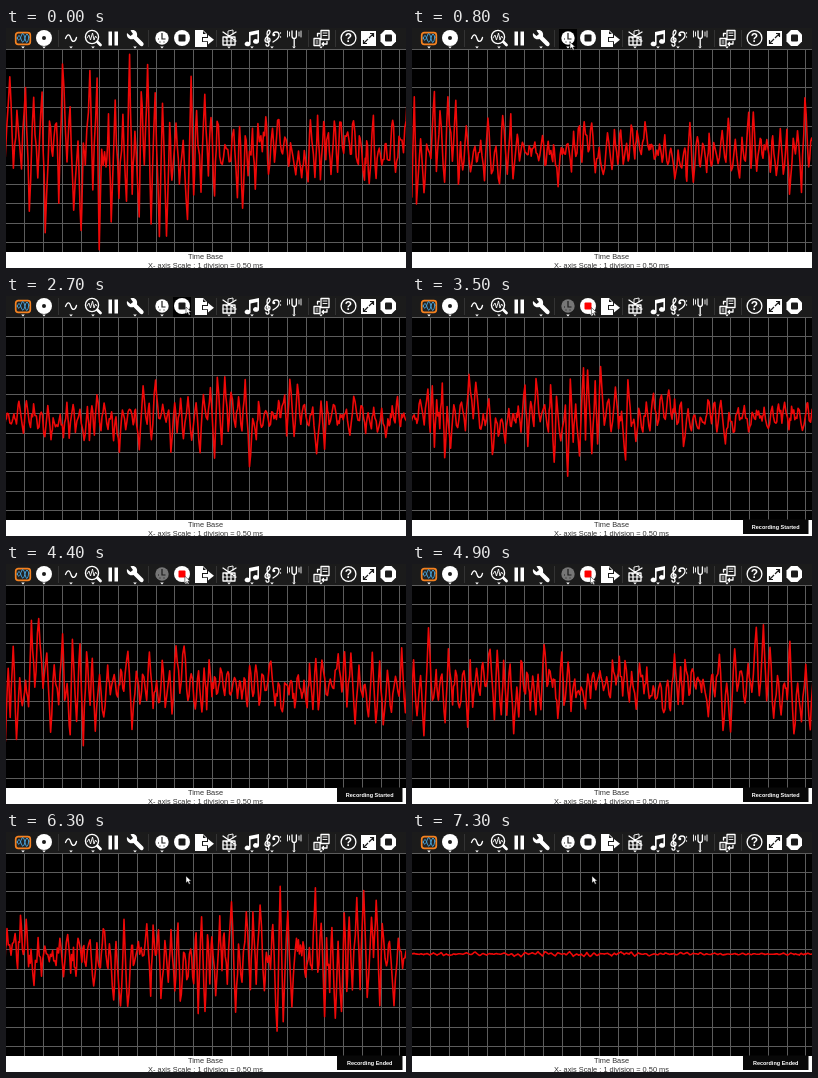
An HTML page that plays this animation: 400 px wide and 240 px high, repeating every 7.4 s.

```html
<!DOCTYPE html>
<html lang="en">
<head>
<meta charset="utf-8">
<title>Oscilloscope recording</title>
<style>
html, body { margin: 0; width: 100%; height: 100%; overflow: hidden; background: #000; }
svg { display: block; width: 100vw; height: 100vh; }
text { font-family: "Liberation Sans", Arial, sans-serif; }
.label { font-size: 7.4px; fill: #333; text-anchor: middle; }
.small { font-size: 5px; font-weight: bold; fill: #fff; }
.icons { fill: #fff; }
.line { fill: none; stroke: #fff; stroke-width: 1.3; stroke-linecap: round; stroke-linejoin: round; }
.thin { stroke-width: .9; }
.dark { fill: #1b1b1b; }
.cut { fill: none; stroke: #1b1b1b; stroke-width: 1.2; }
</style>
</head>
<body>
<svg viewBox="0 0 400 240">
  <rect width="400" height="240"/>
  <path id="grid" fill="none" stroke="#5c5c5c" shape-rendering="crispEdges"/>
  <polyline id="wave" fill="none" stroke="#ee0808" stroke-width="1.6" stroke-linejoin="round"/>

  <rect width="400" height="21" fill="#1b1b1b"/>
  <path d="M52.500 2v17M142.500 2v17M210.500 2v17M302.500 2v17M329.500 2v17" stroke="#333"/>
  <rect id="hover" y="1" width="18" height="20"/>
  <g class="icons">
    <rect x="9.700" y="4.700" width="14.600" height="11.600" rx="2.500" fill="#222" stroke="#f58220" stroke-width="1.700"/>
    <path d="M11 11q2-7 4 0t4-1 4 0M11 9.500q2 6 4-1t4 2 4-2" fill="none" stroke="#49a5dc" stroke-width=".9"/>
    <circle cx="38" cy="10" r="8"/><circle class="dark" cx="38" cy="10" r="2"/>
    <path class="line" d="M59.500 10.500C62 4.500 64 7 65 10.500S69 15 70.500 9.500"/>
    <circle class="line" cx="86" cy="9" r="6.600"/>
    <path class="line thin" d="M81 10l2-3 1.500 5 2-7 1.500 7 1.500-4 1.500 2"/>
    <path class="line" style="stroke-width:2.800" d="M91.500 14l3 3"/>
    <path d="M102.500 3.500h3.500v14h-3.500zM108.500 3.500h3.500v14h-3.500z"/>
    <path d="M121 5l3.500 3 2.500-2-2.500-3.500c4-1.500 7.500 1.500 6.500 6l6 6c2 2.500-1 5-3 3l-6.500-6.500c-4 1.500-7.500-2-6.500-6z"/>
    <g id="timer">
      <circle cx="156" cy="10" r="6.700"/>
      <path class="cut" d="M156 5v6h3.500M152 11h1M153.500 14h1M157.500 14h1"/>
    </g>
    <circle cx="176" cy="10" r="8"/>
    <path id="tail" d="M176 16h7l-3 4z"/>
    <rect id="stop" x="172.500" y="6.500" width="7" height="7" rx="1"/>
    <path d="M189 2h8l4 4v3h-5v5h5v5h-12z"/>
    <path d="M197 10h5V7l6 4.700-6 4.700v-3.200h-5z"/>
    <path class="dark" d="M197 3l3 3h-3z"/>
    <path class="line" d="M217 9h12v8h-12zM221 9v8M225 9v8M217 4l13 9M230 4l-10 6"/>
    <path class="line thin" d="M222 7V3l5-1v4M217 13h12"/>
    <path d="M243 4l10-2v11.500a3 2.300 0 1 1-1.600-2V6l-6.800 1.500V16a3 2.300 0 1 1-1.600-2z"/>
    <path class="line" d="M263 17c-1 2-3 1-3-.5M263 17L261 6c0-4 3-5 3-2s-5 5-5 8 5 3 5 0-3-2-3 0M267 7c0-4 6-4 6 0s-3 5-6 7"/>
    <circle cx="268" cy="7" r="1.300"/><circle cx="274.500" cy="5" r=".7"/><circle cx="274.500" cy="9" r=".7"/>
    <path class="line" d="M286 3v5q0 2.500 2.200 2.500t2.200-2.500V3M288.200 11v7"/>
    <path class="line thin" d="M283.500 4v4M281.500 3v6M293 4v4M295 3v6"/>
    <path class="line" d="M315 2.500h8v9h-8zM308 10.500h6v7h-6zM321 13.500v2.500h-5l1.500-1.500M316 16l1.500 1.500M311.500 8V5.500h2"/>
    <path class="line thin" d="M317 5h4M317 7.500h4M310 13h2M310 15h2"/>
    <circle class="line" cx="342.500" cy="10" r="7.400"/>
    <text x="342.500" y="14.200" font-size="12" font-weight="bold" text-anchor="middle">?</text>
    <path d="M355 3h15v15h-15z"/>
    <path class="cut" d="M363 10l4.500-4.500M364 5.500h3.500V9M362 11l-4.500 4.500M361 15.500h-3.500V12"/>
    <path d="M379 2h6.500l4.500 4.500v7l-4.500 4.500H379l-4.500-4.500v-7z"/>
    <rect class="dark" x="379" y="6.500" width="7" height="7" rx="1"/>
    <path id="arrows"/>
  </g>

  <rect y="224" width="400" height="16" fill="#fff"/>
  <text class="label" x="199.500" y="231">Time Base</text>
  <text class="label" x="199.500" y="239.500">X- axis Scale : 1 division = 0.50 ms</text>

  <g id="menu">
    <rect x="145.500" y="22" width="82" height="69.500" stroke="#777" stroke-width=".8"/>
    <rect id="row0" x="146" y="22" width="81" height="17.300"/>
    <rect id="row1" x="146" y="39.300" width="81" height="17.300"/>
    <g class="small">
      <text x="149.500" y="32">1/10 second</text>
      <text x="149.500" y="49.500">1 second</text>
      <text x="149.500" y="67">30 second</text>
      <text x="149.500" y="84.500">5 minutes</text>
    </g>
  </g>
  <g id="toast">
    <rect x="331" y="223.500" width="65.500" height="14.500" fill="#080808"/>
    <text id="message" class="small" style="font-size:5.500px" x="363.700" y="232.700" text-anchor="middle"></text>
  </g>
  <path id="cursor" d="M0 0v7l1.700-1.500 1.300 2.700 1.300-.6-1.300-2.600h2.300z" fill="#fff" stroke="#111" stroke-width=".5"/>
</svg>
<script>
const LOOP = 7400, STEP = 100, MID = 122;
const $ = id => document.getElementById(id);
const show = (id, on) => $(id).style.display = on ? '' : 'none';
const between = (t, from, to) => t >= from && t < to;

// Each key: time, then the value(s) reached at that time.
const loudness = [[0, 92], [800, 60], [2700, 46], [5500, 72], [6400, 82], [7000, 5], [7300, 2.5]];
const pointer = [[0, 190, 82], [700, 158, 14], [1500, 158, 14], [1900, 168, 43],
  [2300, 168, 46], [2700, 180, 11], [5600, 178, 13], [6300, 180, 44]];

function tween(keys, t) {
  const i = keys.findIndex(k => k[0] > t);
  if (i < 0) return keys.at(-1).slice(1);
  const a = keys[i - 1], b = keys[i], p = (t - a[0]) / (b[0] - a[0]);
  return a.slice(1).map((v, j) => v + (b[j + 1] - v) * p);
}

function random(seed) {
  let s = seed * 7919 + 12345;
  return () => (s = (s * 16807) % 2147483647) / 2147483647;
}

// Alternating random peaks under a drifting swell, joined by jittery slopes.
function trace(t) {
  const rnd = random(t + 1), [amp] = tween(loudness, t);
  const swellCentre = 530 - t * .113;
  const points = [];
  let x = -4, y = MID, dir = 1;
  while (x < 402) {
    const swell = .72 + .28 * Math.cos((x - swellCentre) / 70);
    const drift = .12 * Math.sin(x / 11 + t);
    const height = .08 + .92 * rnd() ** 1.5;
    const nx = x + 2 + rnd() * 2.6;
    const ny = MID + amp * swell * (dir * height + drift);
    for (const p of [.33, .67]) {
      points.push([x + (nx - x) * p, y + (ny - y) * p + (rnd() - .5) * amp * .25]);
    }
    points.push([nx, ny]);
    x = nx;
    y = ny;
    dir = -dir;
  }
  return points.map(q => q.map(v => v.toFixed(1)).join()).join(' ');
}

function drawStatic() {
  let grid = '';
  for (let x = 18.75; x < 400; x += 18.75) grid += `M${Math.floor(x) + .5} 21V224`;
  for (let y = 21.2; y < 224; y += 19.35) grid += `M0 ${Math.floor(y) + .5}H400`;
  $('grid').setAttribute('d', grid);
  $('arrows').setAttribute('d', [17, 38, 65, 87, 129, 156, 223, 246, 266, 288, 315]
    .map(x => `M${x - 1.8} 18.5h3.6l-1.800 2z`).join(''));
}

function render(t) {
  $('wave').setAttribute('points', trace(t));

  const recording = between(t, 2900, 5400);
  $('stop').setAttribute('fill', recording ? '#f00' : '#1b1b1b');
  show('tail', recording);
  $('timer').style.opacity = recording ? .4 : 1;

  const overTimer = between(t, 700, 1700);
  const overStop = between(t, 2600, 2900) || between(t, 5400, 5800);
  show('hover', overTimer || overStop);
  $('hover').setAttribute('x', overTimer ? 147 : 167);

  show('menu', between(t, 1500, 2400));
  $('row0').setAttribute('fill', between(t, 1700, 2000) ? '#a6a6a6' : '#000');
  $('row1').setAttribute('fill', t >= 1900 ? '#777' : '#000');

  show('toast', t >= 3000);
  $('toast').style.opacity = Math.min(1, (t - 2900) / 400);
  $('message').textContent = t < 5800 ? 'Recording Started' : 'Recording Ended';

  const [x, y] = tween(pointer, t);
  show('cursor', t > 0);
  $('cursor').setAttribute('transform', `translate(${x} ${y})`);
}

let last = -1;
function tick() {
  const t = Math.floor(performance.now() % LOOP / STEP) * STEP;
  if (t !== last) render(last = t);
  requestAnimationFrame(tick);
}
drawStatic();
tick();
</script>
</body>
</html>
```
